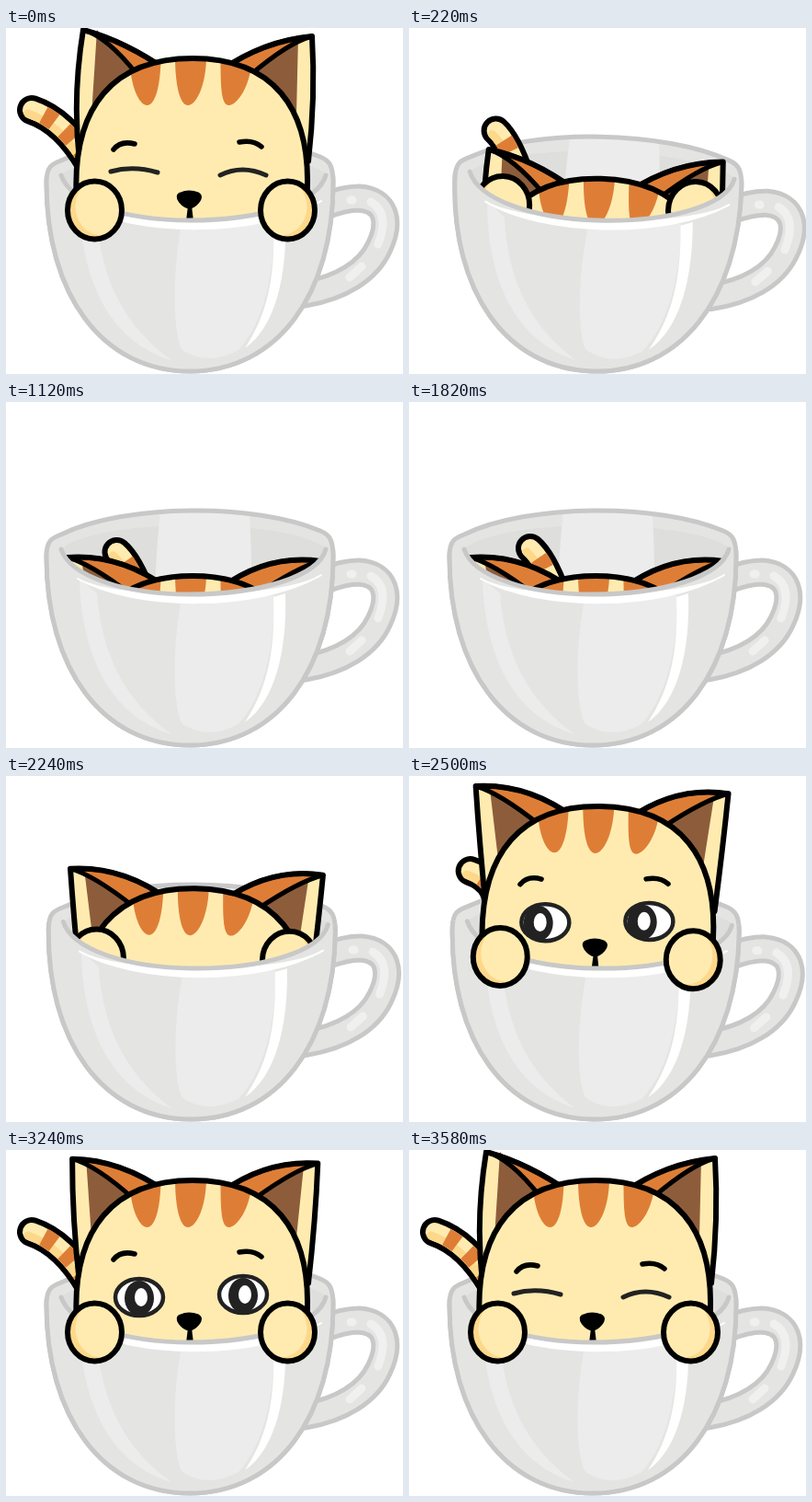
These frames come from a looping animation (432x376 px, 3600 ms). An HTML page with a canvas:

```html
<!DOCTYPE html>
<html lang="en">
<head>
<meta charset="utf-8">
<title>Kitten in a cup</title>
<style>
html, body { margin: 0; width: 100%; height: 100%; overflow: hidden; background: #fff; }
canvas { display: block; width: 432px; height: 376px; }
</style>
</head>
<body>
<canvas id="stage" width="432" height="376"></canvas>
<script>
const ctx = document.getElementById('stage').getContext('2d');
const LOOP = 3600, DIVE = 20, RISE = 2170, POP = 2300;
const INK = '#000', CREAM = '#ffebb0', SHADE = '#fdd88a', ORANGE = '#de7e36', BROWN = '#8d5d3b';
const RIM = '#c8c8c8', CUP = '#e4e4e2', LIGHT = '#ececec';

const progress = (t, from, to) => Math.min(1, Math.max(0, (t - from) / (to - from)));
const ease = (t, from, to) => { const p = progress(t, from, to); return p * p * (3 - 2 * p); };
const bump = (t, from, to) => Math.sin(Math.PI * progress(t, from, to));

function scoped(drawing) {
  ctx.save();
  drawing();
  ctx.restore();
}

function shape(d, fill, stroke, width = 6) {
  const path = typeof d === 'string' ? new Path2D(d) : d;
  if (fill) { ctx.fillStyle = fill; ctx.fill(path); }
  if (stroke) { ctx.strokeStyle = stroke; ctx.lineWidth = width; ctx.stroke(path); }
}

function oval(x, y, rx, ry) {
  const path = new Path2D();
  path.ellipse(x, y, rx, ry, 0, 0, Math.PI * 2);
  return path;
}

const FRONT_RIM = 'M348 160C340 190 275 209 200 209C130 209 70 190 60 160';
const ABOVE_RIM = new Path2D(FRONT_RIM + 'L52 150H-60V-90H500V150H352Z');
const FRONT = new Path2D(FRONT_RIM + 'H30V390H370V160Z');
const BODY = new Path2D('M44 168C44 150 50 148 60 144C130 110 272 110 342 140C352 144 356 150 356 168C356 290 295 373 200 373C105 373 44 290 44 168Z');
const HANDLE = 'M345 194C365 186 375 185 384 185C414 187 419 211 406 238C394 264 365 282 325 289';

function drawCupBack() {
  shape(HANDLE, null, RIM, 31);
  shape(HANDLE, null, CUP, 21);
  shape('M375 187H377M397 189Q418 201 405 235M374 271L387 259', null, '#f0f0f0', 9);
  scoped(() => {
    ctx.clip(BODY);
    shape(BODY, CUP);
    shape('M58 162C90 125 310 125 350 160V220H60Z', '#dededc');
    shape('M169 110H264Q268 160 267 212H162Q163 160 169 110Z', LIGHT);
  });
  shape(BODY, null, RIM, 5);
}

function drawCupFront() {
  scoped(() => {
    ctx.clip(FRONT);
    shape(BODY, CUP);
    shape('M80 192C82 270 110 340 180 361C130 325 104 275 99 208Z', LIGHT);
    shape('M191 214C180 270 182 335 192 350Q220 368 253 350C280 320 292 270 292 210Z', LIGHT);
    shape('M304 208C306 270 293 325 260 348C285 310 293 270 291 212Z', '#fff');
    shape('M78 192C140 227 275 228 343 188C300 216 120 217 78 192Z', '#fff', '#fff', 2);
    shape(BODY, null, RIM, 5);
  });
  shape(FRONT_RIM, null, RIM, 5);
}

function drawTail(x, y, bend, baseX, baseY) {
  const path = `M${x} ${y}Q${x + bend} ${y + 12} ${baseX} ${baseY}`;
  shape(path, null, INK, 32);
  shape(path, null, CREAM, 20);
  scoped(() => {
    ctx.translate(-4, 4);
    shape(path, null, SHADE, 9);
  });
  scoped(() => {
    ctx.lineCap = 'butt';
    ctx.setLineDash([14, 14]);
    ctx.lineDashOffset = 14;
    shape(path, null, ORANGE, 20);
  });
}

// Draws the left ear; the right one is its mirror image with a slightly lower tip.
function drawEar(side, raise) {
  const right = side < 0;
  const x = 67 + (right ? 9 : 17) * raise;
  const y = (right ? 17 : 13) - (right ? 8 : 11) * raise;
  const top = `${x} ${y}Q${124 + 5 * raise} ${9 + 5 * raise} 175 46`;
  const crease = `${137 + 6 * raise} ${54 - 3 * raise}`;
  const outline = `M80 145Q72 75 ${top}`;
  scoped(() => {
    if (right) {
      ctx.translate(409, 0);
      ctx.scale(-1, 1);
    }
    shape(outline + 'Z', CREAM);
    shape(`M${x + 15} ${y}L93 95H200L${crease}Z`, BROWN);
    shape(`M${top}L${crease}Q${x + 26} ${y + 7} ${x} ${y}Z`, ORANGE, INK, 5);
    shape(outline, null, INK);
  });
}

function drawOpenEye(x, y, gaze, open) {
  scoped(() => {
    ctx.translate(x, y);
    ctx.scale(1, open);
    const eye = oval(0, 0, 26, 20);
    shape(eye, '#fff');
    shape(oval(gaze, 1, 16, 19), '#222');
    shape(oval(gaze + 2, 0, 7, 10), '#fff');
    shape(eye, null, '#222', 4.5);
  });
}

function drawFace(t) {
  const happy = t < POP ? 1 : ease(t, 3270, 3360);
  scoped(() => {
    ctx.translate(0, 13 * (happy - 1));
    shape('M117 132Q125 122 140 126M254 124Q269 121 278 129', null, INK, 5.5);
  });
  if (happy > 0.85) {
    shape('M114 156Q138 149 165 157M233 160Q257 148 283 160', null, '#222', 5);
  } else {
    const gaze = 8 * (bump(t, 2700, 3160) - bump(t, 2380, 2680));
    drawOpenEye(145, 160, gaze, 1 - happy);
    drawOpenEye(258, 157, gaze, 1 - happy);
  }
  shape('M190 180Q199 176 209 180Q214 183 209 189Q199 201 189 188Q185 182 190 180Z', INK, INK, 3);
  shape('M198 193H202L204 210H196Z', INK);
}

function drawHead(t) {
  const head = new Path2D('M77 190C70 82 120 33 203 33S336 82 327 190L320 230H85Z');
  shape(head, CREAM);
  scoped(() => {
    ctx.clip(head);
    for (let i = -1; i <= 1; i++) {
      const x = 201 + 49.5 * i, tip = x - 3 - 5 * i;
      shape(`M${x - 17} 30C${x - 17} 62 ${tip - 9} 84 ${tip} 84S${x + 17} 62 ${x + 17} 30Z`, ORANGE);
    }
  });
  shape(head, null, INK);
  drawFace(t);
}

function drawPaw(x, y, side) {
  const paw = oval(x, y, 29.5, 31.5);
  shape(paw, SHADE);
  scoped(() => {
    ctx.clip(paw);
    shape(oval(x + 7 * side, y - 4, 28, 31), CREAM);
  });
  shape(paw, null, INK);
}

function drawPaws(t) {
  const sink = 60 * (ease(t, 160, 340) - ease(t, RISE, 2290));
  const lift = 24 * bump(t, DIVE, 300) + 30 * bump(t, 2190, 2400);
  const y = 198 + sink - lift;
  drawPaw(96.5, y, 1);
  drawPaw(306.5, y, -1);
}

function placeTail(t) {
  if (t > 90 && t < POP) {
    const drift = Math.sqrt(progress(t, 220, 1820));
    const x = 86 + 46 * drift;
    const y = 115 + 60 * ease(t, 220, 520) - 16 * drift;
    drawTail(x, y, 14, x + 28, y + 50);
  } else {
    const tuck = t < POP ? ease(t, 0, 90) : 3.5 * (1 - ease(t, POP, 2750));
    drawTail(28 + 17 * tuck, 89 + 8 * tuck, 36, 91, 148 + 5 * tuck);
  }
}

function drawCat(t, pawsOutside) {
  const depth = ease(t, DIVE, 290) - ease(t, RISE, 2327);
  const raise = 1 - ease(t, 100, 480) + ease(t, 3150, 3400);
  scoped(() => {
    ctx.clip(ABOVE_RIM);
    placeTail(t);
    scoped(() => {
      ctx.translate(0, 156 * depth - 11 * bump(t, 2300, 2480));
      drawEar(1, raise);
      drawEar(-1, raise);
      drawHead(t);
    });
    if (!pawsOutside) drawPaws(t);
  });
}

function draw(t) {
  const tilt = 1.9 * bump(t, 30, 620) + 1.8 * bump(t, 2200, 2560);
  const pawsOutside = t < 130 || t > POP;
  ctx.fillStyle = '#fff';
  ctx.fillRect(0, 0, 432, 376);
  scoped(() => {
    ctx.lineCap = ctx.lineJoin = 'round';
    ctx.translate(200, 376);
    ctx.rotate(tilt * Math.PI / 180);
    ctx.translate(-200, -376);
    drawCupBack();
    drawCat(t, pawsOutside);
    drawCupFront();
    if (pawsOutside) drawPaws(t);
  });
}

const start = performance.now();
function tick() {
  draw((performance.now() - start) % LOOP);
  requestAnimationFrame(tick);
}
tick();
</script>
</body>
</html>
```
